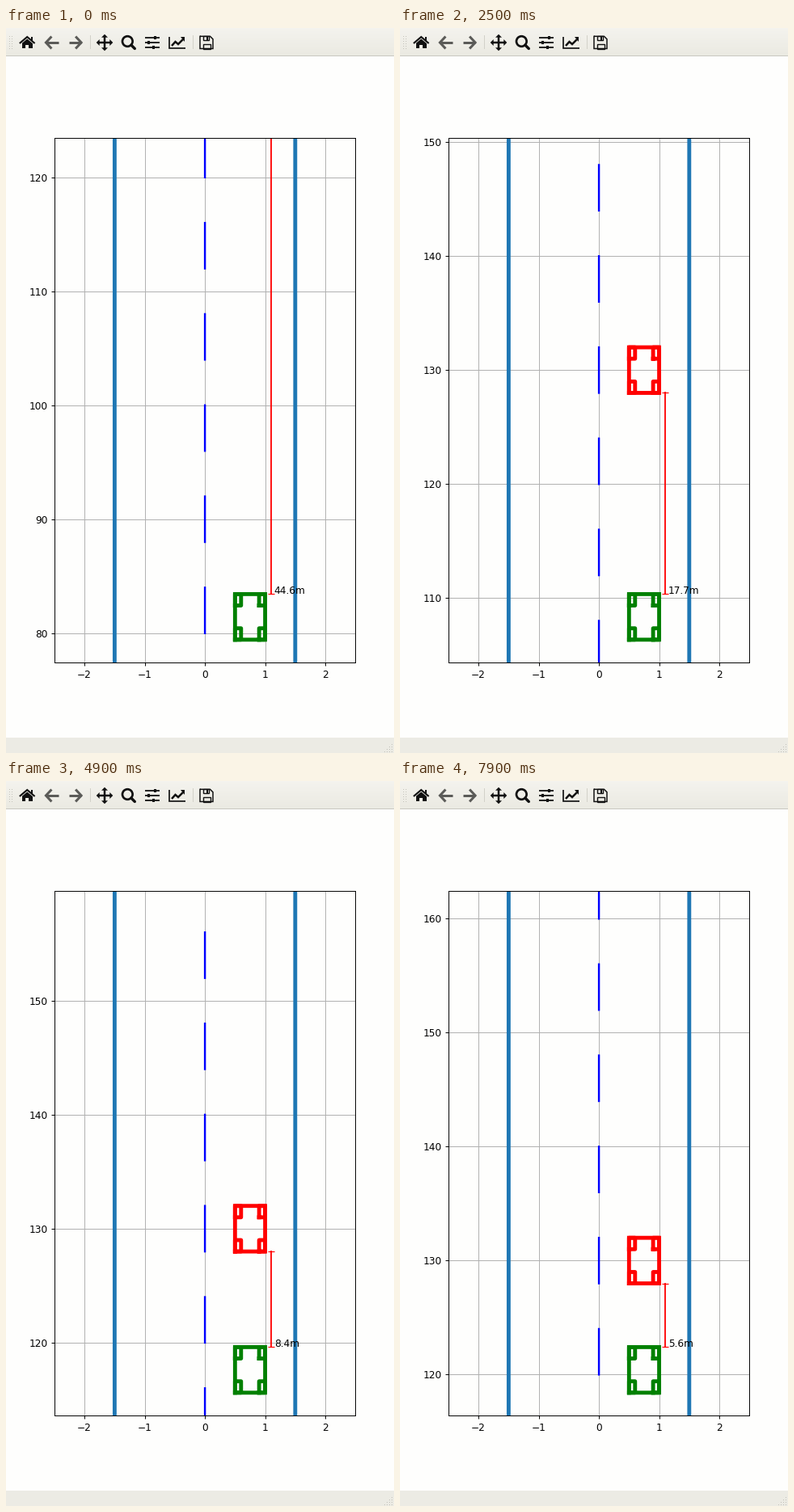
A matplotlib script for the animation above (8 s loop, 480 by 897 pixels).

```python
from itertools import product

import numpy as np
import matplotlib.pyplot as plt
from matplotlib.animation import FuncAnimation
from matplotlib.patches import Circle, Polygon, Rectangle
from matplotlib.ticker import MultipleLocator

W, H, DPI = 480, 897, 87.5
PT = 72 / DPI  # points per pixel
FRAMES, INTERVAL = 80, 100

PAPER, BAR, INK, GREY = "#fefefd", "#ecebe4", "#111111", "#5b5b58"
TOOLBAR, MID, STATUS = 34, 18, 878  # toolbar height, icon centre, status bar

plt.rcParams.update({"font.family": "DejaVu Sans", "font.size": 10})
fig = plt.figure(figsize=(W / DPI, H / DPI), dpi=DPI, facecolor=PAPER)


# ---- window chrome, in pixels from the top left ----
ui = fig.add_axes([0, 0, 1, 1])
ui.axis("off")


def stroke(points, width, color=INK, cap="butt"):
    ui.plot(*zip(*points), color=color, lw=width * PT,
            solid_capstyle=cap, solid_joinstyle="miter")


def box(x, y, w, h, color=INK, outline=0):
    style = ({"fill": False, "ec": color, "lw": outline * PT} if outline
             else {"fc": color, "ec": "none"})
    ui.add_patch(Rectangle((x, y), w, h, **style))


def fill(points, color=INK):
    ui.add_patch(Polygon(points, fc=color, ec="none"))


def arrowhead(x, y, dx, dy, size):
    """Triangle whose tip is at x, y and which points along dx, dy."""
    bx, by = x - dx * size, y - dy * size
    fill([(x, y), (bx + dy * size, by + dx * size),
          (bx - dy * size, by - dx * size)])


def draw_bars():
    ramp = np.linspace([244, 243, 238], [235, 234, 226], TOOLBAR) / 255
    ui.imshow(ramp[:, None, :], extent=(0, W, TOOLBAR, 0), aspect="auto")
    box(0, TOOLBAR, W, 1, "#c9c8c0")
    box(0, STATUS, W, H - STATUS, BAR)
    for x, y in product((4, 7), range(10, 26, 3)):
        box(x, y, 1, 1, "#c4c3bb")
    for x in (104, 231):
        box(x, 9, 1, 17, "#d2d1c9")
    for row in range(4):
        for col in range(row + 1):
            box(477 - 3 * col, 886 + 3 * row, 1.4, 1.4, "#c2c1b9")


def draw_home(x):
    stroke([(x - 9.4, MID + 1), (x, MID - 7), (x + 9.4, MID + 1)], 2.1)
    fill([(x - 6.6, MID + 1), (x, MID - 4.5), (x + 6.6, MID + 1)])
    box(x + 4.5, MID - 7, 2.6, 5)
    for side in (-1, 1):
        box(x + side * 4.2 - 2.4, MID + 1, 4.8, 6.2)
    box(x - 2, MID, 4, 2.6)


def draw_arrow(x, side):
    tip = x + side * 7.6
    stroke([(x - side * 8, MID), (tip, MID)], 3, GREY)
    stroke([(tip - side * 7, MID - 7.5), (tip, MID),
            (tip - side * 7, MID + 7.5)], 3, GREY)


def draw_move(x):
    for dx, dy in ((1, 0), (-1, 0), (0, 1), (0, -1)):
        stroke([(x, MID), (x + 8 * dx, MID + 8 * dy)], 2.5)
        arrowhead(x + 10.3 * dx, MID + 10.3 * dy, dx, dy, 4)


def draw_zoom(x):
    ui.add_patch(Circle((x - 1.5, MID - 1.5), 6.3, fill=False, ec=INK,
                        lw=2.7 * PT))
    stroke([(x + 3, MID + 3), (x + 7.5, MID + 7.5)], 3.4, cap="round")


def draw_sliders(x):
    for row, knob in zip((-1, 0, 1), (3, -5, 1)):
        y = MID + 6 * row
        stroke([(x - 9, y), (x + 9, y)], 1.8)
        box(x + knob - 1.8, y - 2.4, 3.6, 4.8)


def draw_chart(x):
    stroke([(x - 10, MID - 7.5), (x - 10, MID + 7), (x + 10, MID + 7)], 1.7)
    stroke([(x - 7, MID + 4), (x - 2.5, MID - 1), (x + 1, MID + 2),
            (x + 7, MID - 4)], 2.5)
    fill([(x + 3.5, MID - 7), (x + 9, MID - 7), (x + 9, MID - 1.5)])


def draw_save(x):
    left, right, top, bottom = x - 8, x + 8, MID - 7.7, MID + 7.5
    stroke([(left, top), (right - 3.5, top), (right, top + 3.5),
            (right, bottom), (left, bottom), (left, top - 0.7)], 1.5)
    box(left + 3.5, top, 7.7, 5, outline=1.4)
    box(x, top, 2, 4.8)
    box(left + 3.5, bottom - 5.5, 9, 5.5, outline=1.4)


draw_bars()
draw_home(26.2)
draw_arrow(57, -1)
draw_arrow(85.5, 1)
draw_move(122)
draw_zoom(151.8)
draw_sliders(181.3)
draw_chart(212)
draw_save(248)
ui.set(xlim=(0, W), ylim=(H, 0))


# ---- road plot ----
LEFT, RIGHT, TOP, BOTTOM = 59.9, 432.3, 136.4, 785
STOP_REAR, CAR_LENGTH, CAR_WIDTH = 128, 4, 0.5
WHEEL_W, WHEEL_L = 0.1, 1

road = fig.add_axes([LEFT / W, 1 - BOTTOM / H, (RIGHT - LEFT) / W,
                     (BOTTOM - TOP) / H], facecolor=PAPER)
road.set_xlim(-2.5, 2.5)
road.xaxis.set_major_locator(MultipleLocator(1))
road.yaxis.set_major_locator(MultipleLocator(10))
road.grid(True)

for edge in (-1.5, 1.5):
    road.plot([edge, edge], [0, 300], color="C0", lw=4, snap=False)
for start in range(64, 184, 8):
    road.plot([0, 0], [start, start + 4], color="b", lw=2, snap=False)


class Car:
    """Outlined body with a wheel box in each corner."""

    def __init__(self, color, left=0.5):
        self.body = road.add_patch(Rectangle(
            (left, 0), CAR_WIDTH, CAR_LENGTH, fill=False, ec=color, lw=4,
            zorder=2, snap=False))
        self.corners = list(product((left, left + CAR_WIDTH - WHEEL_W),
                                    (0, CAR_LENGTH - WHEEL_L)))
        self.wheels = [road.plot([], [], color=color, lw=4, snap=False)[0]
                       for _ in self.corners]

    def place(self, rear):
        self.body.set_y(rear)
        for line, (x, dy) in zip(self.wheels, self.corners):
            y, right = rear + dy, x + WHEEL_W
            line.set_data([x, right, right, x, x],
                          [y, y, y + WHEEL_L, y + WHEEL_L, y])


parked, mover = Car("red"), Car("green")
parked.place(STOP_REAR)
ruler, = road.plot([], [], color="red", marker="_")
label = road.text(1.15, 0, "")


def gap_at(frame):
    """The gap shrinks exponentially, at a lower rate as the car nears."""
    # One early hitch, then a hold on every fourth frame while creeping
    step = frame - (frame >= 6) - max(0, (frame - 42) // 4)
    return np.exp(np.interp(step, [0, 34, 47, 54, 69],
                            np.log([44.57, 12.003, 8.39, 7.4, 5.59])))


def update(frame):
    gap = gap_at(frame)
    front = STOP_REAR - gap
    mover.place(front - CAR_LENGTH)
    ruler.set_data([1.1, 1.1], [front, STOP_REAR])
    label.set_y(front)
    label.set_text(f"{gap:.1f}m")
    road.set_ylim(front - 6, front + 40)


anim = FuncAnimation(fig, update, frames=FRAMES, init_func=lambda: update(0),
                     interval=INTERVAL, repeat=True, repeat_delay=0)
plt.show()
```
